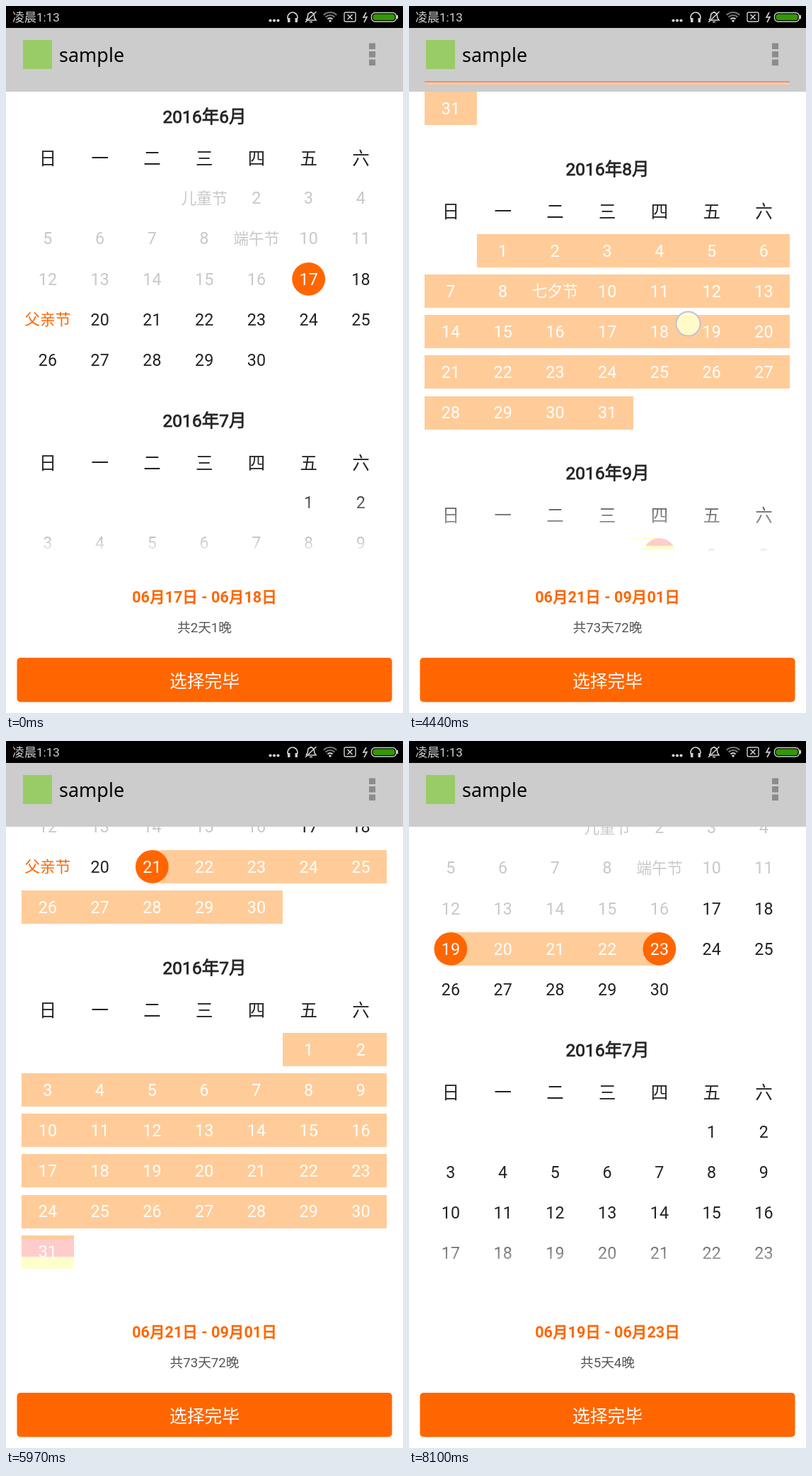
Recreate the animation shown at these times as an HTML page with a canvas. Size 561 by 998 pixels, loop 8.16 s.

```html
<!DOCTYPE html>
<html lang="zh-CN">
<head>
<meta charset="utf-8">
<title>sample</title>
<style>
html, body { margin: 0; width: 100%; height: 100%; overflow: hidden; background: #fff; }
canvas { display: block; width: 561px; height: 998px; }
</style>
</head>
<body>
<canvas id="stage" width="561" height="998"></canvas>
<script>
const ctx = document.getElementById('stage').getContext('2d');
const LOOP = 8160, STEP = 30;
const SANS = 'Roboto, "Noto Sans CJK SC", "Noto Sans CJK", sans-serif';
const ORANGE = '#ff6600', RANGE = '#ffcc99', INK = '#222222', PAST = '#c8c8c8', ICON = '#cfcfcf';
const MID = 280.5, COL = 73.75, LEFT = 22, ROW = 57.15, FIRST_ROW = 115, R = 23.4;
const FADE_TOP = 678, FADE_END = 778, LIST_END = 769;
const WEEK = '日一二三四五六';
const HOLIDAYS = { 601: '儿童节', 609: '端午节', 619: '父亲节', 809: '七夕节', 910: '教师节', 915: '中秋节' };
const TODAY = 617, TAP = 90;

// Each flick moves the list by a distance and slows down; the finger stays for `hold` ms
const FLICKS = [
  ...[0, 1, 2].map(i => ({ at: 2640 + i * 250, dur: 360, by: 1000 / 3, hold: 140, x: 400, y: 620 })),
  { at: 4320, dur: 600, by: -325, hold: 140, x: 394.5, y: 290 },
  { at: 4740, dur: 900, by: -263, hold: 140, x: 380.5, y: 554 },
  { at: 5160, dur: 600, by: -147, hold: 140, x: 390, y: 400 },
  { at: 6094, dur: 600, by: -116, hold: 320, x: 426.5, y: 490 }
];
// Days (month * 100 + day) by the moment they get picked
const TAPS = { 510: 618, 2550: 621, 3870: 901, 7090: 619, 7470: 623 };

const utc = key => Date.UTC(2016, Math.floor(key / 100) - 1, key % 100);

let nextY = 156;
const months = [6, 7, 8, 9].map(m => {
  const first = new Date(utc(m * 100 + 1)).getUTCDay();
  const days = new Date(utc(m * 100 + 100)).getUTCDate();
  const y = nextY;
  nextY += FIRST_ROW + (Math.ceil((first + days) / 7) - 1) * ROW + 85.7;
  return { m, first, days, y };
});

function place(key) {
  const mo = months[Math.floor(key / 100) - 6], n = mo.first + key % 100 - 1;
  return [LEFT + COL * (n % 7 + 0.5), mo.y + FIRST_ROW + Math.floor(n / 7) * ROW];
}

function moved(flick, t) {
  const u = Math.min(1, Math.max(0, (t - flick.at) / flick.dur));
  return flick.by * (1 - (1 - u) ** 3);
}

const offset = t => FLICKS.reduce((sum, f) => sum + moved(f, t), 0);

// An open range is closed by the next tap, a closed one is replaced
function selection(t) {
  let start = TODAY, end = 0, shown = [TODAY, TODAY + 1];
  for (const at in TAPS) {
    if (t < at) break;
    if (end) [start, end] = [TAPS[at], 0];
    else shown = [start, end = TAPS[at]];
  }
  return { start, end, shown };
}

// Colour that fades into white at the foot of the list, smooth or in coarse steps
const paints = {};
function fade(color, coarse) {
  if (paints[color + coarse]) return paints[color + coarse];
  const g = ctx.createLinearGradient(0, FADE_TOP, 0, FADE_END);
  if (coarse) {
    const rgb = [1, 3, 5].map(i => parseInt(color.slice(i, i + 2), 16));
    for (let i = 0; i < 100; i++) {
      const c = rgb.map(v => Math.round((v + (255 - v) * i / 100) / 51) * 51);
      g.addColorStop(i / 100, `rgb(${c})`);
      g.addColorStop((i + 1) / 100, `rgb(${c})`);
    }
  } else {
    g.addColorStop(0, color);
    g.addColorStop(1, '#ffffff');
  }
  return paints[color + coarse] = g;
}

function text(s, x, y, size, fill, { weight = 400, align = 'center', family = SANS, embolden = 0 } = {}) {
  const base = y + size * 0.358;
  ctx.font = `${weight} ${size}px ${family}`;
  ctx.textAlign = align;
  ctx.fillStyle = ctx.strokeStyle = fill;
  ctx.fillText(s, x, base);
  if (embolden) {
    ctx.lineWidth = embolden;
    ctx.strokeText(s, x, base);
  }
}

function box(x, y, w, h, fill) {
  ctx.fillStyle = fill;
  ctx.fillRect(x, y, w, h);
}

function pill(x, y, w, h, r, fill, stroke) {
  ctx.beginPath();
  ctx.roundRect(x, y, w, h, r);
  if (fill) {
    ctx.fillStyle = fill;
    ctx.fill();
  }
  if (stroke) {
    ctx.strokeStyle = stroke;
    ctx.lineWidth = 1.4;
    ctx.stroke();
  }
}

function disc(x, y, r, fill) {
  ctx.beginPath();
  ctx.arc(x, y, r, 0, 7);
  ctx.fillStyle = fill;
  ctx.fill();
}

function line(...pts) {
  ctx.beginPath();
  pts.forEach(p => ctx.lineTo(...p));
  ctx.strokeStyle = ICON;
  ctx.lineWidth = 1.6;
  ctx.stroke();
}

function arc(x, y, r, a, b, color, width) {
  ctx.beginPath();
  ctx.arc(x, y, r, a, b);
  ctx.strokeStyle = color;
  ctx.lineWidth = width;
  ctx.stroke();
}

function statusBar() {
  box(0, 0, 561, 31, '#000');
  text('凌晨1:13', 9, 16, 17, ICON, { align: 'left' });
  for (let i = 0; i < 3; i++) disc(373.5 + i * 5.5, 20.5, 2.1, ICON);
  // headphones
  arc(405, 16, 7, Math.PI * 0.85, Math.PI * 2.15, ICON, 1.7);
  for (const x of [398, 408.5]) box(x, 17, 3.5, 6, ICON);
  // muted bell
  line([424, 20], [426, 17], [427, 11], [431, 8.5], [435, 11], [436, 17], [438, 20], [424, 20]);
  line([429, 22.5], [433, 22.5]);
  line([438.5, 8], [423, 23]);
  // wifi
  for (const r of [5, 9, 13]) arc(458, 22, r, Math.PI * 1.25, Math.PI * 1.75, r < 9 ? ICON : '#777', 2.2);
  disc(458, 21, 1.8, ICON);
  // no sim
  pill(478, 9, 16, 13, 2, null, ICON);
  line([482.5, 12], [489.5, 19]);
  line([489.5, 12], [482.5, 19]);
  // charging battery
  line([509, 9], [505, 16], [510, 15.5], [506, 23]);
  pill(516.5, 9.5, 35, 12.5, 5, null, ICON);
  pill(518.5, 11.5, 31, 8.5, 3.5, '#339900');
  box(552, 13, 2, 5, ICON);
}

function header() {
  box(0, 31, 561, 90, '#cccccc');
  box(24, 48, 41, 41, '#99cc66');
  text('sample', 75, 69.5, 27, '#000', { align: 'left', family: '"Noto Sans", "Open Sans", sans-serif' });
  for (let i = 0; i < 3; i++) box(513, 52.5 + i * 11.5, 9, 8.5, '#8c8c8c');
}

function rangeCell(key, x, y, { start, end }, clipTop) {
  if (key < start || key > end) return;
  const x0 = Math.round(key === start ? x : x - COL / 2);
  const x1 = Math.round(key === end ? x : x + COL / 2);
  const top = Math.round(y - R);
  box(x0, top, x1 - x0, 47, fade(RANGE, true));
  if (clipTop < 120 && top < clipTop && top + 47 > clipTop) box(x0, clipTop, x1 - x0, 2, '#ee8c88');
}

function dayLabel(key, x, y, { start, end }) {
  if (key === start || key === end) {
    disc(x, y, R, fade(ORANGE, true));
    text(key % 100, x, y, 23.3, '#fff');
    return;
  }
  const name = HOLIDAYS[key];
  const color = key > start && key < end ? '#ffffff' : key < TODAY ? PAST : name ? ORANGE : INK;
  text(name || key % 100, x, y, name ? 21.8 : 23.3, fade(color, false));
}

function calendar(s, clipTop, sel) {
  ctx.save();
  ctx.beginPath();
  ctx.rect(0, clipTop, 561, LIST_END - clipTop);
  ctx.clip();
  const ink = fade(INK, false), cells = [];
  for (const { m, days, y } of months) {
    text(`2016年${m}月`, MID, y - s, 24.5, ink, { embolden: 0.8 });
    for (let i = 0; i < 7; i++) text(WEEK[i], LEFT + COL * (i + 0.5), y + 59.7 - s, 24.5, ink);
    for (let d = 1; d <= days; d++) {
      const key = m * 100 + d, [x, cy] = place(key);
      if (cy - s > 70 && cy - s < 800) cells.push([key, x, cy - s]);
    }
  }
  for (const c of cells) rangeCell(...c, sel, clipTop);
  for (const c of cells) dayLabel(...c, sel);
  ctx.restore();
}

function footer([start, end]) {
  const two = n => String(n).padStart(2, '0');
  const date = k => `${two(Math.floor(k / 100))}月${two(k % 100)}日`;
  const nights = (utc(end) - utc(start)) / 864e5;
  text(`${date(start)} - ${date(end)}`, MID, 834, 21.6, ORANGE, { weight: 700 });
  text(`共${nights + 1}天${nights}晚`, MID, 877, 18.7, '#555');
  pill(15.5, 920, 530, 62.5, 5, ORANGE);
  text('选择完毕', MID, 953, 24.8, '#fff');
}

function finger(x, y, tinted) {
  disc(x, y, 17, tinted ? 'rgba(255,255,204,.93)' : 'rgba(255,255,255,.7)');
  arc(x, y, 17, 0, 7, '#c4c0d8', 2);
}

function draw(t) {
  const s = offset(t), sel = selection(t);
  const moving = Math.abs(s - offset(t - STEP)) > 0.05;
  box(0, 0, 561, 998, '#fff');
  statusBar();
  header();
  calendar(s, moving ? 106 : 121, sel);
  footer(sel.shown);
  for (const f of FLICKS) {
    if (t > f.at && t < f.at + f.hold) finger(f.x, f.y - moved(f, t), sel.end);
  }
  for (const at in TAPS) {
    const [x, y] = place(TAPS[at]);
    if (t >= at - TAP && t < at) finger(x, y - s, false);
  }
}

const begin = performance.now();
function tick() {
  const t = (performance.now() - begin) % LOOP;
  draw(Math.floor(t / STEP) * STEP);
  requestAnimationFrame(tick);
}
tick();
</script>
</body>
</html>
```
